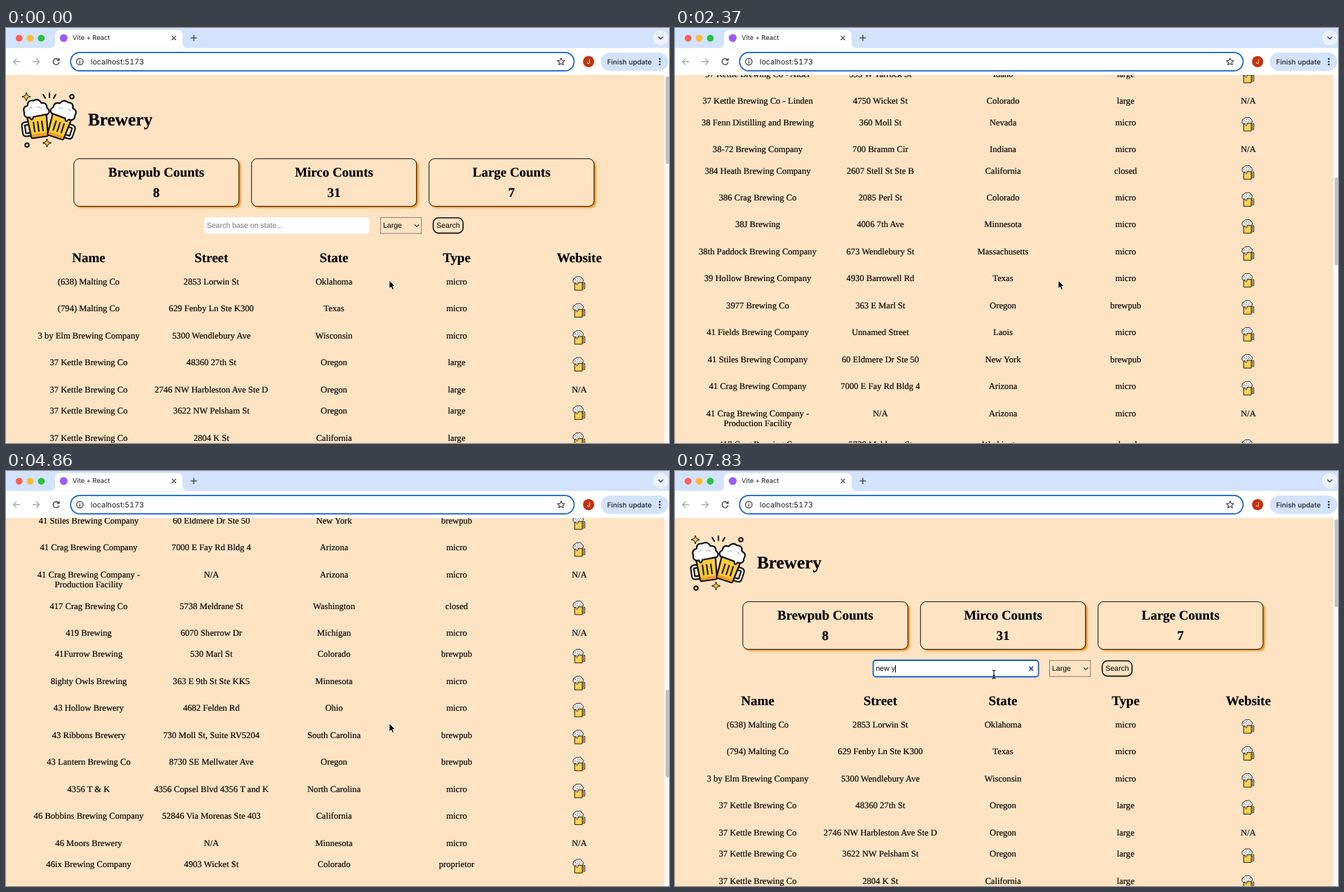
Animation, 946 px wide and 592 px high, one loop 8 s. Source, as an HTML page:

```html
<!DOCTYPE html>
<html lang="en">
<head>
<meta charset="utf-8">
<title>Brewery</title>
<style>
html, body { margin: 0; width: 100%; height: 100%; overflow: hidden; background: #fff; }
svg { display: block; width: 946px; height: 592px; text-rendering: geometricPrecision; }
.serif { font-family: "Liberation Serif", serif; font-size: 12.64px; text-anchor: middle; stroke: #000; stroke-width: .16px; }
.head { font-weight: 700; font-size: 18.96px; }
.form { font-family: "Liberation Sans", sans-serif; font-size: 10.53px; }
.ui { font-family: Inter, sans-serif; font-variant-numeric: tabular-nums; fill: #1f2024; }
.line { fill: none; stroke: #3c4043; stroke-width: 1.3; stroke-linecap: round; stroke-linejoin: round; }
</style>
</head>
<body>
<svg id="stage" viewBox="0 0 946 592"></svg>
<script>
const PAPER = '#fee3c3', BLUE = '#1760cf', SKY = '#d3e3fd';
const COLS = [118, 293, 468, 643, 818];
const TYPES = { m: 'micro', l: 'large', b: 'brewpub', c: 'closed', p: 'proprietor', k: 'contract' };

// name | street | state | type, a trailing "-" marks a missing website
const ROWS = `(638) Malting Co|2853 Lorwin St|Oklahoma|m
(794) Malting Co|629 Fenby Ln Ste K300|Texas|m
3 by Elm Brewing Company|5300 Wendlebury Ave|Wisconsin|m
37 Kettle Brewing Co|48360 27th St|Oregon|l
37 Kettle Brewing Co|2746 NW Harbleston Ave Ste D|Oregon|l-
37 Kettle Brewing Co|3622 NW Pelsham St|Oregon|l
37 Kettle Brewing Co|2804 K St|California|l
37 Kettle Brewing Co - Fern Pub|48340 NE 27th St|Oregon|l-
37 Kettle Brewing Co - Alder|593 W Tarrock St|Idaho|l
37 Kettle Brewing Co - Linden|4750 Wicket St|Colorado|l-
38 Fenn Distilling and Brewing|360 Moll St|Nevada|m
38-72 Brewing Company|700 Bramm Cir|Indiana|m-
384 Heath Brewing Company|2607 Stell St Ste B|California|c
386 Crag Brewing Co|2085 Perl St|Colorado|m
38J Brewing|4006 7th Ave|Minnesota|m
38th Paddock Brewing Company|673 Wendlebury St|Massachusetts|m
39 Hollow Brewing Company|4930 Barrowell Rd|Texas|m
3977 Brewing Co|363 E Marl St|Oregon|b
41 Fields Brewing Company|Unnamed Street|Laois|m
41 Stiles Brewing Company|60 Eldmere Dr Ste 50|New York|b
41 Crag Brewing Company|7000 E Fay Rd Bldg 4|Arizona|m
41 Crag Brewing Company -/Production Facility|N/A|Arizona|m-
417 Crag Brewing Co|5738 Meldrane St|Washington|c
419 Brewing|6070 Sherrow Dr|Michigan|m-
41Furrow Brewing|530 Marl St|Colorado|b
8ighty Owls Brewing|363 E 9th St Ste KK5|Minnesota|m
43 Hollow Brewery|4682 Felden Rd|Ohio|m
43 Ribbons Brewery|730 Moll St, Suite RV5204|South Carolina|b
43 Lantern Brewing Co|8730 SE Mellwater Ave|Oregon|b
4356 T & K|4356 Copsel Blvd 4356 T and K|North Carolina|m
46 Bobbins Brewing Company|52846 Via Morenas Ste 403|California|m
46 Moors Brewery|N/A|Minnesota|m-
46ix Brewing Company|4903 Wicket St|Colorado|p
46th Moth Brewing|377 N Marl St Ste 4|Vermont|m
48 Pegs Brewing|964 Rendall Rd|Ohio|b
48 Yoke Brewing Co|628 S Bramley St|Delaware|m
48 Flint Brewpub|7365 Marl St|New York|b
4857 Brewing CO, llc|3379 colonel Tarwin Ct|Maryland|k-
4939 Brewing Co|544 E Crest Ave|Iowa|m
4936 Pellacove Brewing|3347 Orlin Tammish Hwy|North Carolina|b
4962 Brewing Company|33307 Plume Rd|Virginia|m-
490 and Corked|4030 B Stone Ave|Pennsylvania|m
4938 Brewery|300 D South Umber St|Mississippi|m-
4970 Brewing Company|564 E Wend St|Wisconsin|m
4983 Brewing Co|718 Tessel St|Ohio|m
49th Wren Brewing|2640 Larrow Rd|Texas|b
51 Thistle Brewery|395 N Quill Ave|Oregon|m
52 Spokes Brewing Co|8120 Dunnow St|Iowa|m
5283 Brewing Company|460 Yarrel Dr|Virginia|m-
53 Quarry Brewing|1770 Ferrin Ln|Vermont|m`.split('\n');

const esc = s => s.replace(/&/g, '&amp;');
const text = (x, y, s, cls, more = '') => `<text x="${x}" y="${y}" class="${cls}" ${more}>${esc(s)}</text>`;
const path = (d, more = 'class="line"') => `<path d="${d}" ${more}/>`;
const rect = (x, y, w, h, r, more) => `<rect x="${x}" y="${y}" width="${w}" height="${h}" rx="${r}" ${more}/>`;
const disc = (x, y, r, more) => `<circle cx="${x}" cy="${y}" r="${r}" ${more}/>`;

function table() {
  let y = 365.8, out = '';
  ['Name', 'Street', 'State', 'Type', 'Website'].forEach((s, i) => out += text(COLS[i], 334, s, 'serif head'));
  for (const row of ROWS) {
    const [name, street, state, type] = row.split('|');
    const lines = name.split('/'), site = !type[1];
    lines.forEach((s, i) => out += text(COLS[0], y + i * 14.4, s, 'serif'));
    [street, state, TYPES[type[0]]].forEach((s, i) => out += text(COLS[i + 1], y, s, 'serif'));
    out += site ? `<use href="#pint" x="808" y="${y - 12.3}"/>` : text(COLS[4], y, 'N/A', 'serif');
    y += site ? 38.47 : lines.length > 1 ? 44.7 : 30.4;
  }
  return out;
}

function mug(place) {
  return `<g transform="${place}" stroke="#111" stroke-width="2.2" stroke-linejoin="round">
    ${path('M13 1H18Q21 1 21 4V14Q21 17 18 17H12', 'fill="none" stroke-width="6.4"')}
    ${path('M13 1H18Q21 1 21 4V14Q21 17 18 17H12', 'fill="none" stroke="#fff" stroke-width="2.2"')}
    ${path('M-14-9H14L12 21Q12 23 10 23H-10Q-12 23-12 21Z', 'fill="#fdcb3b"')}
    ${path('M-11 18H11V22H-11Z', 'fill="#f49a28" stroke="none"')}
    ${path('M-6 0V15M0 0V15M6 0V15', 'stroke-width="2"')}
    ${path('M-16-8q-5-4 0-9q-1-8 7-8q3-8 11-5q8-2 9 6q8 1 6 9q2 6-4 8h-3q-2 7-5 0z', 'fill="#fff"')}
    ${path('M-8-17q2-4 6-2M4-21q4-1 5 3', 'fill="none" stroke="#c8c8c8" stroke-width="1.6"')}</g>`;
}

function spark(x, y) {
  return path(`M${x} ${y - 6}L${x + 1.6} ${y - 1.6}L${x + 6} ${y}L${x + 1.6} ${y + 1.6}L${x} ${y + 6}L${x - 1.6} ${y + 1.6}L${x - 6} ${y}L${x - 1.6} ${y - 1.6}Z`,
    'fill="#fdcb3b" stroke="#111" stroke-width="1"');
}

function emblem() {
  const ring = 'fill="none" stroke="#111" stroke-width="2"';
  return mug('translate(45 133) rotate(-8) scale(-1 1)') + mug('translate(77.5 134) rotate(18)') +
    spark(29, 98) + spark(58.5, 164) + disc(94, 98, 2.8, ring) + disc(30, 167, 2.8, ring) +
    path('M62 93V99M53 95L56 100M71 95L68 100', 'stroke="#111" stroke-width="2" stroke-linecap="round"');
}

function cards() {
  return [['Brewpub', 8, 214.5], ['Mirco', 31, 468], ['Large', 7, 721.3]].map(([s, n, x]) =>
    rect(x - 115.5, 188.5, 236, 68, 8, 'fill="#f08a10" filter="url(#soft)"') +
    rect(x - 117.7, 186.4, 235.4, 68, 8, `fill="${PAPER}" stroke="#111" stroke-width="1"`) +
    text(x, 212, s + ' Counts', 'serif head') + text(x, 241.3, n + '', 'serif head')).join('');
}

function form() {
  return rect(283, 270, 235.5, 23.3, 3.5, 'fill="#fff"') +
    rect(282.8, 270, 235.8, 23.5, 3.5, `id="ring" fill="none" stroke="${BLUE}" stroke-width="1.8"`) +
    text(286.5, 285.2, '', 'form', 'id="query"') +
    path('M0 277V287.5', 'id="caret" stroke="#000" stroke-width="1"') +
    path('M505.6 279.2L511 284.8M511 279.2L505.6 284.8', 'id="clear" stroke="#2450b5" stroke-width="1.7"') +
    rect(534.4, 270.3, 58.4, 22.8, 0, 'fill="none" stroke="#767676" stroke-width=".9"') +
    text(538, 285.2, 'Large', 'form') +
    path('M583 280.3L586.2 283.5L589.4 280.3', 'fill="none" stroke="#222" stroke-width="1.1"') +
    rect(609.6, 270.8, 42.6, 21.8, 7.5, 'fill="none" stroke="#111" stroke-width="1.6"') +
    text(614.2, 285.2, 'Search', 'form');
}

function chrome() {
  const lights = ['#ff5f57', '#febc2e', '#28c23f'].map((c, i) => disc(18.7 + 15.8 * i, 14.6, 4.9, `fill="${c}"`)).join('');
  return rect(0, 0, 946, 67, 0, 'fill="#fff"') + rect(0, 0, 946, 28.5, 0, `fill="${SKY}"`) + lights +
    path('M62 28.6Q70 28.6 70 21V11Q70 3 78 3H244Q252 3 252 11V21Q252 28.6 260 28.6Z', 'fill="#fff"') +
    disc(82.3, 14.3, 5.6, 'fill="#9b5cf6"') + text(95, 17.4, 'Vite + React', 'ui', 'font-size="9.4"') +
    path('M237 11.6L242.2 16.8M242.2 11.6L237 16.8M264 14.2H272M268 10.2V18.2') +
    disc(934.3, 14, 10.8, 'fill="#ebf2fe"') + path('M931.4 12.8L934.3 15.7L937.2 12.8') +
    path('M19.8 48H10.6M14.6 44L10.6 48L14.6 52M38.4 48H47.6M43.6 44L47.6 48L43.6 52', 'class="line" style="stroke:#a9abae"') +
    path('M75.2 45.7A4.3 4.3 0 1 0 75.7 49.3M75.9 43.4V46.2H73') +
    rect(92.2, 34.8, 718.4, 26.4, 13.2, `fill="#fff" stroke="${BLUE}" stroke-width="1.7"`) +
    disc(105.3, 48, 4.7, 'class="line"') + path('M105.3 47.6V50.4M105.3 45.5V45.6') +
    text(120.8, 51.8, 'localhost:5173', 'ui', 'font-size="10.7"') +
    path('M792 42.9L793.5 46.3L797.2 46.6L794.4 49L795.3 52.6L792 50.7L788.7 52.6L789.6 49L786.8 46.6L790.5 46.3Z', 'class="line" style="stroke-width:1.1"') +
    disc(831.3, 48, 8, 'fill="#c5320f"') + text(831.3, 51.3, 'J', 'ui', 'font-size="9" text-anchor="middle" style="fill:#fff"') +
    rect(848.8, 35, 96.2, 26.2, 13.1, `fill="${SKY}"`) +
    text(857.8, 51.6, 'Finish update', 'ui', 'font-size="9.9" font-weight="500"') +
    [43.9, 48, 52.1].map(y => disc(932.8, y, 1.25, 'fill="#1f2024"')).join('');
}

const stage = document.getElementById('stage');
stage.innerHTML = `<defs>
  <filter id="soft" x="-5%" y="-15%" width="110%" height="130%"><feGaussianBlur stdDeviation="1.2"/></filter>
  <clipPath id="view"><rect y="67" width="946" height="525"/></clipPath>
  <g id="pint" stroke="#2b2620" stroke-width="1" stroke-linejoin="round">
    ${path('M14 10.8H17V17.6H14', 'fill="none" stroke-width="2.8"')}
    ${path('M14 10.8H17V17.6H14', 'fill="none" stroke="#f6e3a0" stroke-width="1"')}
    ${path('M3.4 7H14.2V20.6H3.4Z', 'fill="#f8cb3e"')}
    ${path('M6.2 13V18M8.9 12V18M11.6 12V18', 'stroke="#fde48e"')}
    ${path('M2.8 10.4Q0 9 1.2 6.4Q1 3.6 3.8 3.2Q5.6 .2 8.6 1.4Q12.4 0 13.6 3.6Q16.8 4.8 15.4 8.2Q14.2 10 12 9.5H8V12Q6.5 14 5.5 12V10.2Z', 'fill="#ececea"')}
    ${path('M3.6 6.4L5 5.2M7 3.8L8.4 4.4M10.6 4.2L11.8 5.4M6.4 7.6L7.8 6.8M9.8 7.6L11 7.2M13 6.6L13.8 7.4', 'stroke="#666" stroke-width=".9"')}
  </g></defs>
  <g clip-path="url(#view)">
    ${rect(0, 67, 946, 525, 0, `fill="${PAPER}"`)}
    <g id="page">${emblem()}${text(163, 139.3, 'Brewery', 'serif', 'style="font-size:25.28px;font-weight:700"')}${cards()}${form()}${table()}</g>
    ${rect(939.3, 67, 6.7, 525, 0, 'fill="#fafafa"')}
    ${rect(941.2, 69, 5.2, 125, 2.6, 'id="thumb" fill="#c1c1c1"')}
  </g>
  ${chrome()}
  <g id="arrow">${path('M0 0V11.8L2.7 9.4L4.5 13.5L6.7 12.6L4.9 8.5H8.6Z', 'stroke="#fff" stroke-width="1" stroke-linejoin="round"')}</g>
  <g id="beam">${path('M-2.6-6Q0-6 0-4V4Q0 6-2.6 6M2.6-6Q0-6 0-4M0 4Q0 6 2.6 6M-1.6 1.6H1.6', 'fill="none" stroke="#111" stroke-width="1.1"')}</g>`;

const $ = id => document.getElementById(id);
const show = (id, on) => $(id).setAttribute('visibility', on ? 'visible' : 'hidden');
const move = (id, x, y) => $(id).setAttribute('transform', `translate(${x} ${y})`);

// The screen refreshes every TICK ms; scroll offsets start at tick 5.
const LOOP = 8000, TICK = 147.2;
const SCROLL = [42, 96, 96, 116, 142, 160, 160, 215, 330, 430, 512, 587.6, 680, 785, 905, 1130, 1357.5,
  1450, 1510, 1550, 1575, 1588, 1565, 1510, 1430, 1330, 1215, 1100, 989.5, 915, 850, 690, 520, 370, 245, 147, 78, 30, 1];
const WORD = 'new y';

function draw(ms) {
  const k = Math.floor(ms / TICK);
  const top = SCROLL[k - 5] || 0;
  move('page', 0, -top);
  $('thumb').setAttribute('y', 69 + top * .2455);

  const go = Math.min(Math.max((k - 43) / 3, 0), 1);
  const x = 546.8 - 91.8 * go, y = 360 - 70 * go;
  move('arrow', x, y);
  move('beam', x, y);
  show('arrow', go < 1);
  show('beam', go === 1);

  const typed = WORD.slice(0, Math.max(0, k - 48)), query = $('query');
  query.textContent = typed || 'Search base on state...';
  query.setAttribute('fill', typed ? '#000' : '#757575');
  query.style.whiteSpace = 'pre';
  show('ring', go === 1);
  show('caret', go === 1);
  show('clear', typed);
  move('caret', 287 + (typed ? query.getComputedTextLength() : 0), 0);
}

const start = performance.now();
function frame() {
  draw((performance.now() - start) % LOOP);
  requestAnimationFrame(frame);
}
frame();
</script>
</body>
</html>
```
